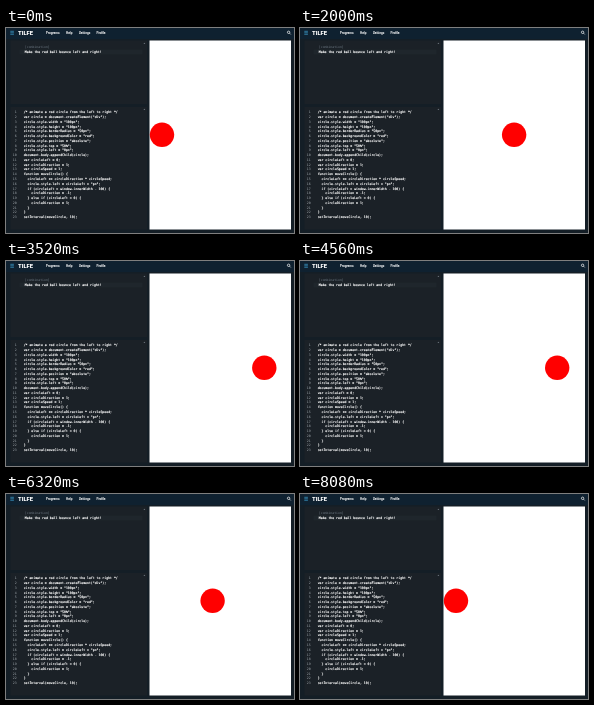
These frames come from a looping animation (288 by 205 pixels, 10000 ms). An HTML page:

```html
<!DOCTYPE html>
<html lang="en">
<head>
<meta charset="utf-8">
<title>Bouncing ball editor</title>
<style>
  html, body { margin: 0; width: 100%; height: 100%; overflow: hidden; background: #141e26; }
  svg { display: block; width: 288px; height: 205px; }
  text { white-space: pre; }
  .code { font: 3.2px "DejaVu Sans Mono", "Liberation Mono", monospace; fill: #fff; stroke: #fff; stroke-width: .16px; }
  .num { fill: #a3abb1; stroke: none; text-anchor: end; }
  .dim { fill: #6d7983; stroke: none; }
  .nav { font: 500 3.1px Roboto, "Open Sans", sans-serif; fill: #fff; stroke: #fff; stroke-width: .08px; }
  .brand { font: 900 5.8px Roboto, "Liberation Sans", sans-serif; fill: #fff; }
</style>
</head>
<body>
<svg id="stage" viewBox="0 0 288 205">
  <rect width="288" height="205" fill="#141e26"/>
  <rect width="288" height="11" fill="#0f2130"/>
  <path d="M4.3 3.3h3.6M4.3 4.8h3.6M4.3 6.3h3.6" stroke="#3d9fd0" stroke-width=".7"/>
  <text class="brand" x="12" y="7.2">TILFE</text>
  <g fill="none" stroke="#fff" stroke-width=".7">
    <circle cx="282.6" cy="4.3" r="1.2"/>
    <path d="M283.5 5.2l1.2 1.2"/>
  </g>
  <rect x="4.5" y="12.5" width="136.5" height="63.5" fill="#1b2127"/>
  <rect x="13.5" y="21.6" width="123" height="4.8" fill="#1f262c"/>
  <rect x="4.5" y="79" width="136.5" height="122.5" fill="#1b2127"/>
  <path d="M137.5 15.8l.9-1.1.9 1.1zM137.5 81.8l.9-1.1.9 1.1z" fill="#89929a"/>
  <rect x="143.5" y="12.5" width="141.5" height="189" fill="#fff"/>
  <circle id="ball" cy="106.8" r="12.2" fill="#f00"/>
</svg>
<script>
const stage = document.getElementById("stage");
const ball = document.getElementById("ball");

function write(text, x, y, cls) {
  const el = document.createElementNS("http://www.w3.org/2000/svg", "text");
  el.setAttribute("x", x);
  el.setAttribute("y", y);
  el.setAttribute("class", cls);
  el.textContent = text;
  stage.append(el);
}

[["Programs", 40], ["Help", 60], ["Settings", 73], ["Profile", 90.5]]
  .forEach(([label, x]) => write(label, x, 6, "nav"));

write("[combination]", 18.8, 20.4, "code dim");
write("Make the red ball bounce left and right!", 18.8, 25.3, "code");

const code = `/* animate a red circle from the left to right */
var circle = document.createElement("div");
circle.style.width = "100px";
circle.style.height = "100px";
circle.style.borderRadius = "50px";
circle.style.backgroundColor = "red";
circle.style.position = "absolute";
circle.style.top = "50%";
circle.style.left = "0px";
document.body.appendChild(circle);
var circleLeft = 0;
var circleDirection = 1;
var circleSpeed = 1;
function moveCircle() {
  circleLeft += circleDirection * circleSpeed;
  circle.style.left = circleLeft + "px";
  if (circleLeft > window.innerWidth - 100) {
    circleDirection = -1;
  } else if (circleLeft < 0) {
    circleDirection = 1;
  }
}
setInterval(moveCircle, 10);`;

code.split("\n").forEach((line, i) => {
  const y = 85.2 + i * 4.77;
  write(i + 1, 10.6, y, "code num");
  write(line, 17.7, y, "code");
});

const LOOP = 10000, STEP = 80, HOME = 156;

// Out to the right wall, back, then rest at home.
function ballX(ms) {
  const n = Math.floor((ms % LOOP) / STEP);
  const out = HOME + 2.325 * n;
  const back = 257.2 - 2.3 * (n - 57);
  return Math.max(HOME, Math.min(out, back));
}

const start = performance.now();
function draw(now) {
  ball.setAttribute("cx", ballX(Math.max(0, now - start)));
  requestAnimationFrame(draw);
}
draw(start);
</script>
</body>
</html>
```
